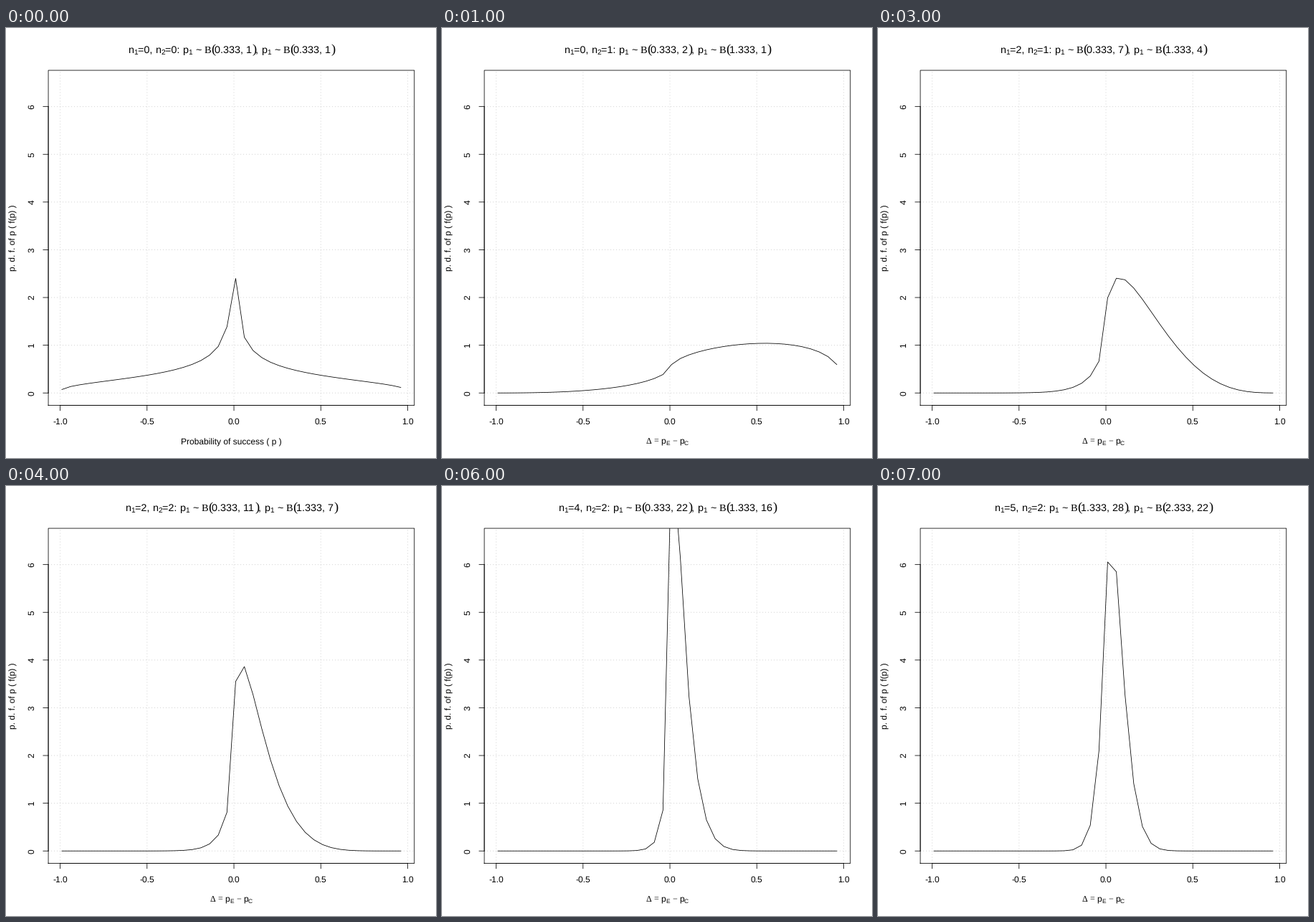
These frames come from a looping animation (600 by 600 pixels, 8 s). A matplotlib script:

```python
import math

import matplotlib.pyplot as plt
import numpy as np
from matplotlib.animation import ArtistAnimation
from matplotlib.patches import Rectangle

plt.rcParams["text.hinting"] = "none"

SIZE, DPI = 600, 100
PT = 72 / DPI
SANS, SERIF = "Liberation Sans", "Liberation Serif"

# Plot region in pixels (y grows downwards) and its data limits
LEFT, RIGHT, TOP, BOTTOM = 59.04, 569.76, 59.04, 526.56
X0, X1, Y0, Y1 = -1.068, 1.038, -0.26, 6.76
XTICKS = [-1, -0.5, 0, 0.5, 1]
YTICKS = range(7)
CENTRE = (LEFT + RIGHT) / 2

fig = plt.figure(figsize=(SIZE / DPI, SIZE / DPI), dpi=DPI, facecolor="white")
ax = fig.add_axes([0, 0, 1, 1])
ax.set_xlim(0, SIZE)
ax.set_ylim(SIZE, 0)
ax.axis("off")


def px(x):
    return LEFT + (x - X0) / (X1 - X0) * (RIGHT - LEFT)


def py(y):
    return BOTTOM - (y - Y0) / (Y1 - Y0) * (BOTTOM - TOP)


def line(xs, ys, color="black", width=0.8, **kw):
    return ax.plot(xs, ys, color=color, lw=width * PT, snap=False, **kw)[0]


def text(x, y, s, size=12, family=SANS, ha="center", **kw):
    return ax.text(x, y, s, fontsize=size * PT, family=family, ha=ha,
                   va="baseline", **kw)


# Rich text: runs are (string, size, family, baseline shift, advance)

WIDE = {" ": 0.278, ",": 0.278, ".": 0.278, ":": 0.278, "=": 0.584,
        "~": 0.584, "E": 0.667, "C": 0.722}


def run(s, size, family=SANS, drop=0, advance=None):
    if advance is None:
        advance = size * sum(WIDE.get(c, 0.556) for c in s)
    return s, size, family, drop, advance


def lay_out(runs, y):
    x = CENTRE - sum(r[4] for r in runs) / 2
    artists = []
    for s, size, family, drop, advance in runs:
        if s.strip():
            artists.append(text(x, y + drop, s, size, family, ha="left"))
        x += advance
    return artists


def with_sub(s, sub, size):
    return [run(s, size), run(sub, 0.7 * size, drop=0.16 * size)]


def beta_runs(a, b):
    size = 14.4
    paren = dict(size=18.5, family=SERIF, drop=-0.2, advance=5.25)
    return (with_sub("p", "1", size)
            + [run(" ", size), run("~", size), run(" ", size),
               run("B", size, SERIF, advance=0.667 * size),
               run("(", **paren),
               run(f"{a:.3f}, {b}", size),
               run(")", **paren)])


def title(n1, n2, first, second):
    size = 14.4
    runs = (with_sub("n", "1", size) + [run(f"={n1}, ", size)]
            + with_sub("n", "2", size) + [run(f"={n2}: ", size)]
            + beta_runs(*first) + [run(", ", size)] + beta_runs(*second))
    return lay_out(runs, 35)


def delta_label():
    size = 12
    gap = run(" ", size)

    def sym(s, em):
        return run(s, size, SERIF, advance=em * size)

    runs = ([sym("\u0394", 0.612), gap, sym("=", 0.549), gap]
            + with_sub("p", "E", size) + [gap, sym("\u2212", 0.549), gap]
            + with_sub("p", "C", size))
    return lay_out(runs, 579.7)


# Density of the difference of two beta variables

def beta_pdf(p, a, b):
    log_norm = math.lgamma(a + b) - math.lgamma(a) - math.lgamma(b)
    return math.exp(log_norm) * p ** (a - 1) * (1 - p) ** (b - 1)


def diff_pdf(d, first, second, n=4000):
    # p = span * u^3 removes the singularity at zero
    u = (np.arange(n) + 0.5) / n
    span = 1 - abs(d)
    p = span * u ** 3
    low, high = (first, second) if d > 0 else (second, first)
    f = beta_pdf(p, *low) * beta_pdf(p + abs(d), *high)
    return np.mean(f * 3 * span * u ** 2)


def curve(first, second):
    d = -0.99 + 0.05 * np.arange(40)
    f = np.array([diff_pdf(v, first, second) for v in d])
    art = line(px(d), py(f), zorder=2, solid_joinstyle="round")
    art.set_clip_path(region)
    return art


# Static parts

region = Rectangle((LEFT, TOP), RIGHT - LEFT, BOTTOM - TOP,
                   transform=ax.transData)

dots = dict(color="lightgray", width=1, zorder=1, dashes=(1, 3))
for v in XTICKS:
    x = px(v)
    line([x, x], [BOTTOM, TOP], **dots)
    line([x, x], [BOTTOM, BOTTOM + 7.2])
    text(x, 553, f"{v:.1f}")
for v in YTICKS:
    y = py(v)
    line([LEFT, RIGHT], [y, y], **dots)
    line([LEFT, LEFT - 7.2], [y, y])
    text(42, y, str(v), ha="right", rotation=90).set(va="center")

line([px(-1), px(1)], [BOTTOM, BOTTOM])
line([LEFT, LEFT], [py(0), py(6)])
line([LEFT, RIGHT, RIGHT, LEFT, LEFT], [BOTTOM, BOTTOM, TOP, TOP, BOTTOM],
     solid_joinstyle="miter")
text(16, (TOP + BOTTOM) / 2, "p. d. f. of p ( f(p) )", ha="right",
     rotation=90).set(va="center")

# Trial steps: patients per arm and the two posteriors

arms = [(0, 0), (0, 1), (1, 1), (2, 1), (2, 2), (3, 2), (4, 2), (5, 2)]
first, second = (1 / 3, 1), (1 / 3, 1)
frames = []
for step, (n1, n2) in enumerate(arms):
    if step:
        hit1 = int(step == 7)
        hit2 = int(step in (1, 7))
        first = (first[0] + hit1, first[1] + step - hit1)
        second = (second[0] + hit2, second[1] + step - 1)
        label = delta_label()
    else:
        label = [text(CENTRE, 581.8, "Probability of success ( p )")]
    frames.append([curve(first, second)] + title(n1, n2, first, second) + label)

anim = ArtistAnimation(fig, frames, interval=1000, repeat=True, repeat_delay=0)
plt.show()
```
